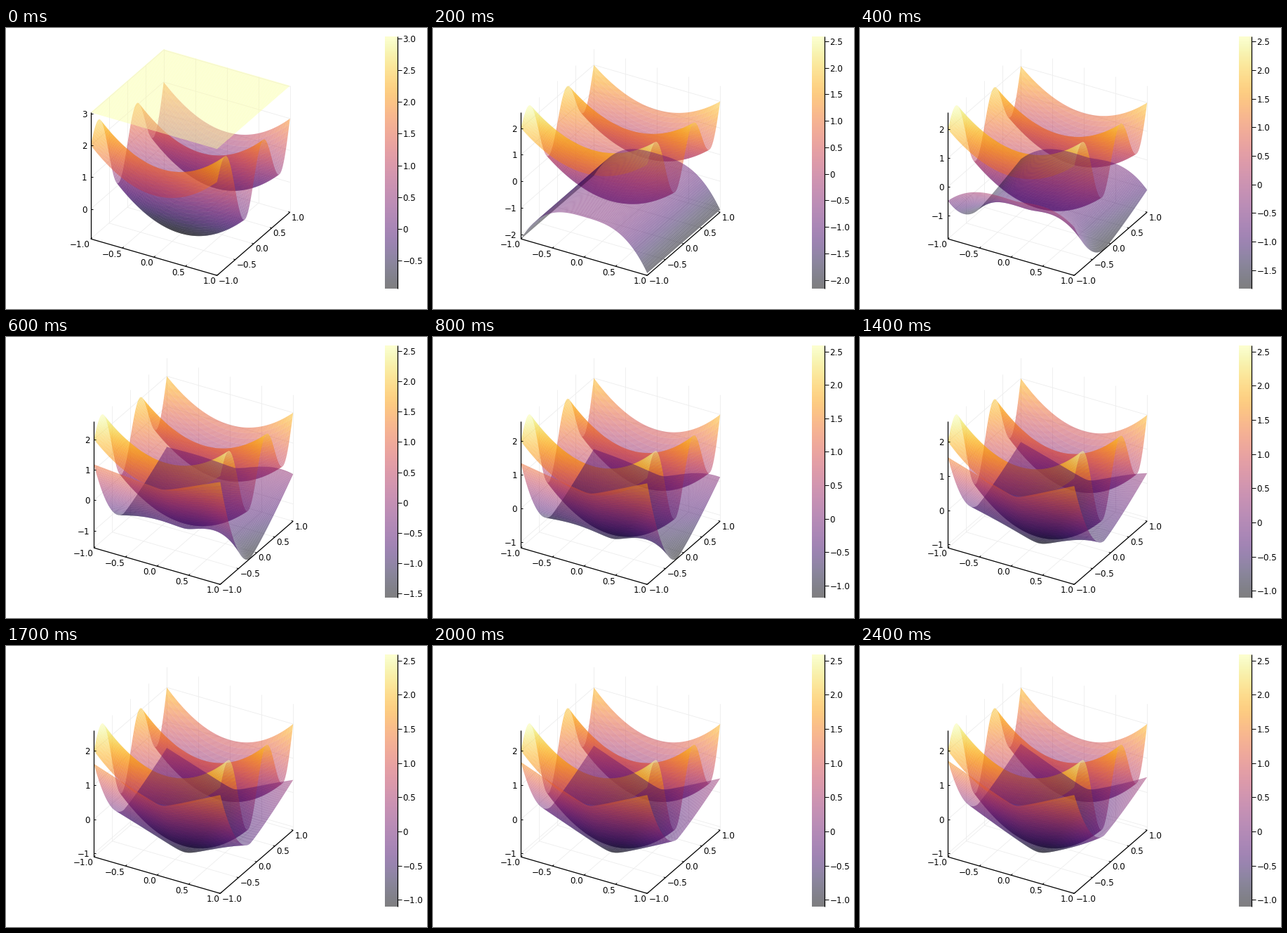
Write a matplotlib script that moves like this. It is 600x400 px and loops after 2.5 s.

```python
import numpy as np
import matplotlib.pyplot as plt
from matplotlib.animation import FuncAnimation

FRAMES, INTERVAL = 25, 100
N = 100
ALPHA = 0.52
BASE_Y, HEIGHT = 300.2, 180
BAR = (540, 558, 371, 12)
CMAP = plt.get_cmap("inferno")

plt.rcParams["font.family"] = "DejaVu Sans"
fig = plt.figure(figsize=(6, 4), dpi=100, facecolor="white")
ax = fig.add_axes([0, 0, 1, 1])

# Rows run from the back of the box to the front.
X, Y = np.meshgrid(np.linspace(-1, 1, N + 1), np.linspace(1, -1, N + 1))
TARGET = X**2 + Y**2 + np.sin(2 * np.pi * Y)

START = 3.03
VALLEY = 0.41
KINK = 0.06
RIDGE = -0.65 - 1.47 * np.abs(X - 0.01) ** 3


def ease(u):
    u = np.clip(u, 0, 1)
    return u * u * (3 - 2 * u)


def bowl(frame):
    """Valley along x whose sagging ends rise into wings as the fit settles."""
    f = max(frame, 6)
    t = (Y + 1) / 2
    near = np.clip(1 - t / VALLEY, 0, 1) ** 1.9
    far = np.clip((t - VALLEY) / (1 - VALLEY), 0, 1) ** 1.2
    floor = np.interp(f, [6, 10, 14], [-1.07, -1.005, -1.1])
    slope = np.where(X < KINK, 0.82 * (1 - np.exp(-(f - 4) / 8)), 0.93)
    wing = slope * (np.hypot(X - KINK, 0.08) - 0.08)
    droop = 1.6 * np.exp(-(f - 6) / 8) - 0.3
    sag = droop * (1 - near - 0.65 * far) * (0.65 + 0.35 * X) * np.abs(X) ** 3
    return floor + 2.07 * near + 0.7 * far + wing - sag


def model(frame):
    """Flat sheet drops to a ridge, then bends into the bowl."""
    drop = np.clip(frame / 2, 0, 1)
    fit = ease((frame - 2) / 4)
    return (1 - drop) * START + drop * ((1 - fit) * RIDGE + fit * bowl(frame))


def ticks(lo, hi, step):
    return np.arange(np.ceil(lo / step), np.floor(hi / step) + 1) * step + 0.0


def label(x, y, value, fmt, ha):
    text = format(value, fmt).replace("-", "\u2212")
    ax.text(x, y, text, fontsize=8.6, ha=ha, va="center_baseline")


def line(p, q, color="black", lw=0.72, z=1):
    ax.plot([p[0], q[0]], [p[1], q[1]], color=color, lw=lw, zorder=z,
            solid_capstyle="butt")


def draw_box(proj, lo, hi, zticks):
    def grid(p, q):
        line(proj(*p), proj(*q), "0.93", 0.6)

    for v in ticks(-1, 1, 0.5):
        grid((v, -1, lo), (v, 1, lo))
        grid((v, 1, lo), (v, 1, hi))
        grid((-1, v, lo), (1, v, lo))
        grid((-1, v, lo), (-1, v, hi))
    for v in zticks:
        grid((-1, -1, v), (-1, 1, v))
        grid((-1, 1, v), (1, 1, v))

    corner = proj(1, -1, lo)
    line(proj(-1, -1, lo), proj(-1, -1, hi), lw=0.9, z=4)
    line(proj(-1, -1, lo), corner, lw=0.9, z=4)
    line(corner, proj(1, 1, lo), lw=0.9, z=4)

    for v in ticks(-1, 1, 0.5):
        px, py = proj(v, -1, lo)
        line((px, py), (px + 2, py - 1.7), z=4)
        label(px - 0.8, py + 7.3, v, ".1f", "right")
        px, py = proj(1, v, lo)
        line((px, py), (px - 2.5, py - 0.7), z=4)
        label(px + 2, py + 6.3, v, ".1f", "left")
    for v in zticks:
        px, py = proj(-1, -1, v)
        line((px, py), (px + 3, py), z=4)
        label(px - 5.5, py, v, ".0f", "right")


def draw_bar(lo, hi):
    left, right, bottom, top = BAR
    ramp = CMAP(np.linspace(1, 0, 256))[:, None, :3]
    ax.imshow(0.5 + 0.5 * ramp, extent=BAR, aspect="auto",
              interpolation="nearest")
    line((right, top), (right, bottom), lw=0.9)
    for v in ticks(lo, hi, 0.5):
        y = bottom - (bottom - top) * (v - lo) / (hi - lo)
        line((right, y), (right + 6, y))
        label(right + 7.5, y, v, ".1f" if v else ".0f", "left")


def draw(frame):
    ax.clear()
    ax.axis("off")
    sheet = model(frame)
    lo = min(TARGET.min(), sheet.min())
    hi = max(TARGET.max(), sheet.max())
    zticks = ticks(lo, hi, 1)
    # Minus signs on the height axis push the box to the right.
    left = 125.3 if zticks[0] < 0 else 120.8

    def proj(x, y, z):
        u, t = (x + 1) / 2, (y + 1) / 2
        return (left + 180 * u + 103.9 * t,
                BASE_Y + 52 * u - 90 * t - HEIGHT * (z - lo) / (hi - lo))

    draw_bar(lo, hi)
    draw_box(proj, lo, hi, zticks)
    for order, z in enumerate((TARGET, sheet)):
        px, py = proj(X, Y, z)
        mean = (z[:-1, :-1] + z[1:, :-1] + z[:-1, 1:] + z[1:, 1:]) / 4
        ax.pcolormesh(px, py, mean, cmap=CMAP, vmin=lo, vmax=hi, alpha=ALPHA,
                      shading="flat", antialiased=True, linewidth=0,
                      snap=False, zorder=2 + order)
    ax.set_xlim(0, 600)
    ax.set_ylim(400, 0)
    return []


anim = FuncAnimation(fig, draw, frames=FRAMES, interval=INTERVAL, repeat=True)
plt.show()
```
